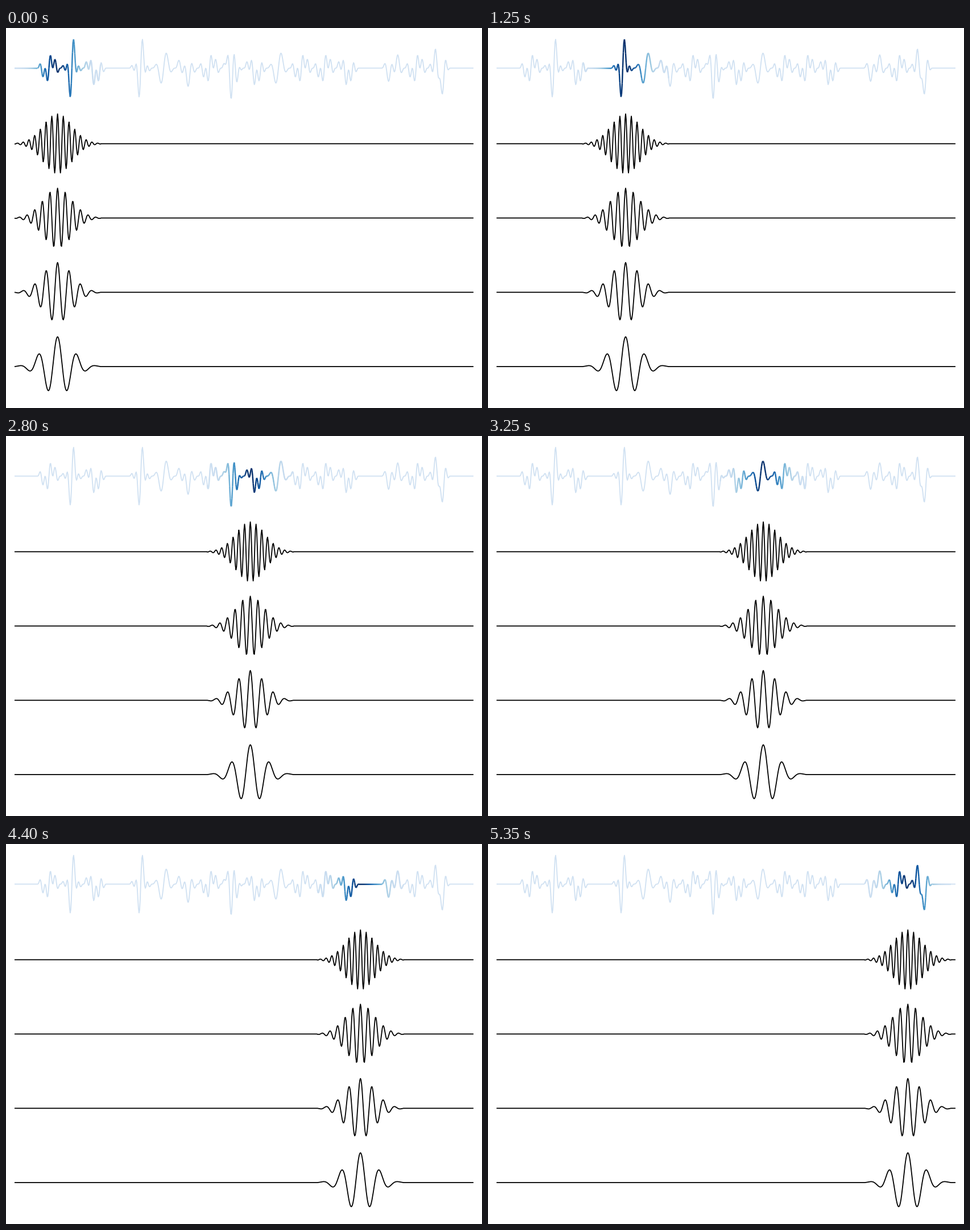
Animation of 837x669 px, one loop 5400 ms. Source, as a matplotlib script:

```python
import numpy as np
import matplotlib.pyplot as plt
from matplotlib.animation import FuncAnimation
from matplotlib.collections import LineCollection

W, H, DPI = 837, 669, 64
PX = 72 / DPI                      # points per pixel
LEFT, RIGHT = 15, 822
N, SEG, WIN, STEP = 800, 40, 150, 6
FRAMES, INTERVAL = 108, 50

PERIODS = [10, 40 / 3, 20, 100 / 3]          # in samples, one per row
ROWS = [203.7, 334.5, 465.3, 596.1]
ROW_AMP = 52.5
SIGNAL_Y, SIGNAL_AMP = 70.6, 30.4

# Which periods sound in each stretch of the signal
TONES = ["", "012", "02", "0123", "", "02", "2", "123", "012", "023",
         "0123", "2", "012", "012", "0123", "", "12", "012", "013", ""]

x = LEFT + np.arange(N + 1) * (RIGHT - LEFT) / N


def make_signal():
    n = np.arange(SEG)
    hann = np.sin(np.pi * n / SEG) ** 2
    y = np.zeros(N + 1)
    for k, tones in enumerate(TONES):
        for tone in tones:
            y[k * SEG:(k + 1) * SEG] += hann * np.sin(2 * np.pi * n / PERIODS[int(tone)])
    return y


lag = np.arange(WIN + 1) - WIN / 2
envelope = np.exp(-0.5 * (lag / 25) ** 2)
wavelets = [envelope * np.cos(2 * np.pi * lag / p) for p in PERIODS]

signal_y = SIGNAL_Y - SIGNAL_AMP * make_signal()
points = np.column_stack([x, signal_y])
segments = np.stack([points[:-1], points[1:]], axis=1)

blues = plt.get_cmap("Blues")
glow = blues(0.2 + 0.8 * (envelope[:-1] + envelope[1:]) / 2)

fig = plt.figure(figsize=(W / DPI, H / DPI), dpi=DPI, facecolor="white")
ax = fig.add_axes([0, 0, 1, 1])
ax.set_xlim(0, W)
ax.set_ylim(H, 0)
ax.axis("off")

style = dict(lw=1.8 * PX, solid_capstyle="butt", solid_joinstyle="round")
ax.plot(x, signal_y, color=blues(0.2), **style)
highlight = LineCollection(segments[:WIN], colors=glow, linewidths=2.4 * PX, zorder=3)
ax.add_collection(highlight)
rows = [ax.plot(x, np.full(N + 1, y), color="black", **style)[0] for y in ROWS]


def update(frame):
    start = frame * STEP
    highlight.set_segments(segments[start:start + WIN])
    for line, base, wave in zip(rows, ROWS, wavelets):
        y = np.full(N + 1, base)
        y[start:start + WIN + 1] -= ROW_AMP * wave
        line.set_ydata(y)
    return [highlight, *rows]


anim = FuncAnimation(fig, update, frames=FRAMES, interval=INTERVAL,
                     repeat=True, repeat_delay=0, blit=False)
plt.show()
```
